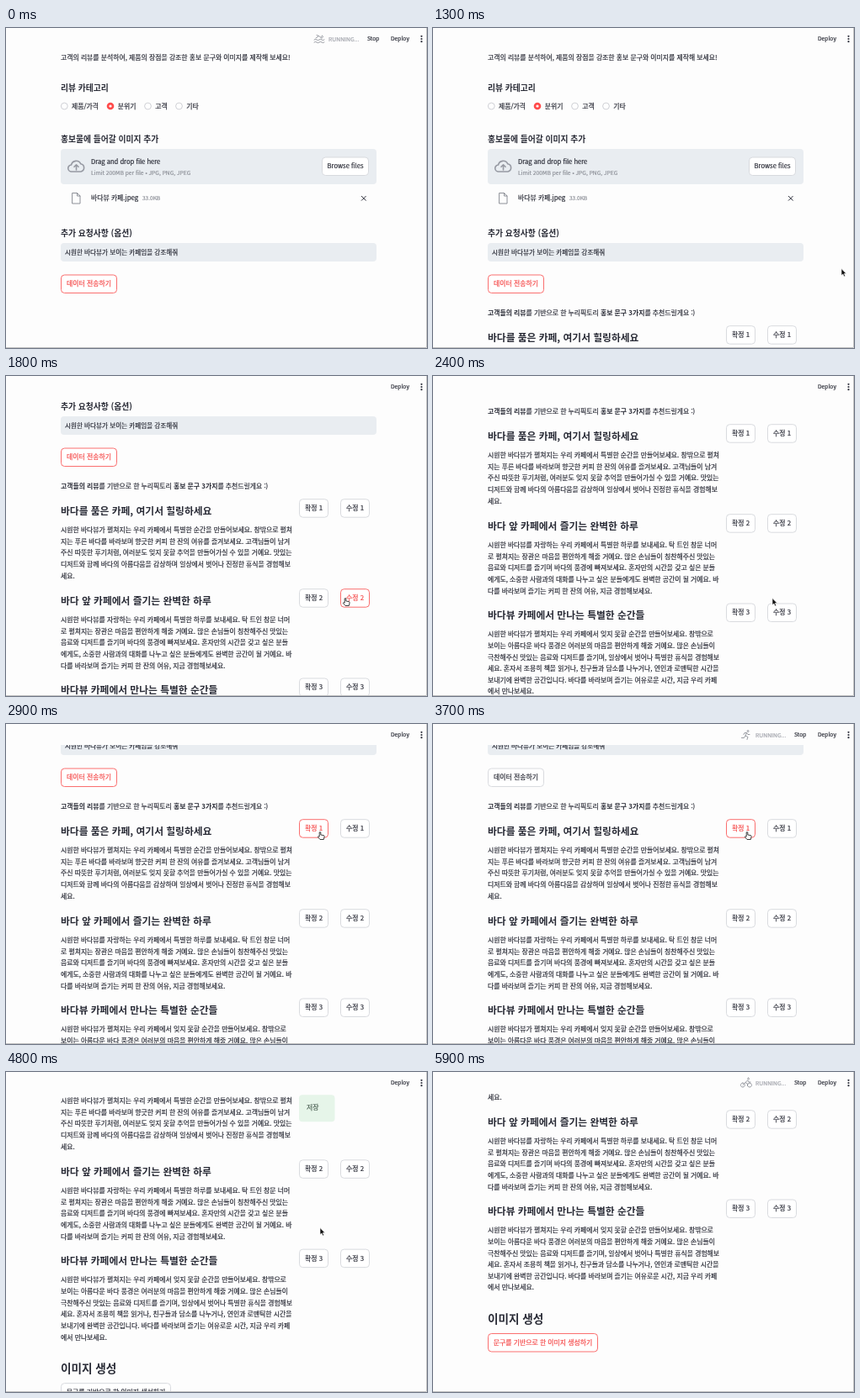
Recreate the animation shown at these times as an HTML page. Size 500 by 381 pixels, loop 6000 ms.

```html
<!DOCTYPE html>
<html lang="ko">
<head>
<meta charset="utf-8">
<style>
  html, body { margin: 0; width: 100%; height: 100%; overflow: hidden; background: #fdfdfd; }
  svg { display: block; width: 500px; height: 381px; }
  text {
    font-family: "Noto Sans CJK KR", "Noto Sans CJK JP", "Noto Sans CJK", sans-serif;
    color: #292b36; fill: currentColor; stroke: currentColor; stroke-width: .2; white-space: pre;
  }
  .line { fill: none; stroke-linecap: round; stroke-linejoin: round; }
  .button rect { fill: #fff; stroke: #d3d5da; stroke-width: .85; }
  .button.hot rect { stroke: #fa5555; }
  .button.hot text { color: #f54848; }
</style>
</head>
<body>
<svg id="stage" viewBox="0 0 500 381"></svg>
<script>
const LOOP = 6000, STEP = 100;
const BODY = 7.86, LATIN = 7.6, LEADING = 13.65, SECTION = 9.8;
const GRAY = '#8d9098', RED = '#ff4b4b';

// y is the visual middle of the line
const text = (x, y, content, size = BODY, extra = '') =>
  `<text x="${x}" y="${y + size * 0.37}" font-size="${size}" ${extra}>${content}</text>`;
const bold = (x, y, content, size) => text(x, y, content, size, 'font-weight="600" style="stroke:none"');
const tinted = (x, y, content, size, color) => text(x, y, content, size, `style="color:${color}"`);
const box = (x, y, w, h, fill) => `<rect x="${x}" y="${y}" width="${w}" height="${h}" rx="4" fill="${fill}"/>`;
const stroke = (d, color, width = 1, id = '') =>
  `<path class="line" id="${id}" d="${d}" stroke="${color}" stroke-width="${width}"/>`;
const lines = (y, list) => list.map((s, i) => text(65, y + i * LEADING, s)).join('');

const buttons = [];
function button(id, x, y, w, label, size = BODY) {
  buttons.push({ id, x, y, w, h: 21.5 });
  return `<g class="button" id="${id}"><rect x="${x}" y="${y}" width="${w}" height="21.5" rx="4"/>` +
    text(x + w / 2, y + 10.5, label, size, 'text-anchor="middle"') + '</g>';
}

function radio(x, label, on) {
  const mark = on
    ? `<circle cx="${x}" cy="93" r="4.3" fill="${RED}"/><circle cx="${x}" cy="93" r="1.6" fill="#fff"/>`
    : `<circle cx="${x}" cy="93" r="3.9" fill="#fff" stroke="#c3c5cb" stroke-width=".8"/>`;
  return mark + text(x + 8.7, 93, label);
}

function idea(n, y, title, paragraph) {
  return bold(65, y + 0.3, title, 11.78) +
    button('ok' + n, 348.5, y - 13.3, 34, '확정 ' + n) +
    button('edit' + n, 397.5, y - 13.3, 34, '수정 ' + n) +
    lines(y + 23, paragraph);
}

const form =
  text(65, 35, '고객의 리뷰를 분석하여, 제품의 장점을 강조한 홍보 문구와 이미지를 제작해 보세요!') +
  bold(65, 71, '리뷰 카테고리', SECTION) +
  radio(69.3, '제품/가격') + radio(124, '분위기', true) + radio(168.5, '고객') + radio(205.5, '기타') +
  bold(65, 132, '홍보물에 들어갈 이미지 추가', SECTION) +
  box(65, 144, 375, 42, '#e9edf1') +
  stroke('M79 171h-1a4 4 0 0 1-.5-8a6 6 0 0 1 11.3-1.2a4.7 4.7 0 0 1 .2 9.2zM83.5 169v-6M81 165.3l2.5-2.5l2.5 2.5', '#9699a2', 1.6) +
  text(101, 159.5, 'Drag and drop file here', LATIN) +
  tinted(101, 173, 'Limit 200MB per file • JPG, PNG, JPEG', 6.68, GRAY) +
  button('browse', 375.5, 154, 55, 'Browse files', LATIN) +
  stroke('M79 196.5h5.5l3.5 3.5v9h-9zM84.5 196.5v3.5h3.5', GRAY) +
  text(101, 202, '바다뷰 카페.jpeg', 7.87) +
  tinted(162, 202.5, '33.0KB', 6.5, GRAY) +
  stroke('M422.3 200.3l5 5m0-5l-5 5', '#31333f') +
  bold(65, 244, '추가 요청사항 (옵션)', SECTION) +
  box(65, 256, 375, 22, '#e9edf1') +
  text(70, 266.7, '시원한 바다뷰가 보이는 카페임을 강조해줘', 7.6) +
  button('send', 65.5, 294, 66, '데이터 전송하기');

const b = s => `<tspan font-weight="600" style="stroke:none">${s}</tspan>`;
const results =
  text(65, 339, `${b('고객들의 리뷰')}를 기반으로 한 누리픽토리 ${b('홍보 문구 3가지')}를 추천드릴게요 :)`) +
  idea(1, 368, '바다를 품은 카페, 여기서 힐링하세요', [
    '시원한 바다뷰가 펼쳐지는 우리 카페에서 특별한 순간을 만들어보세요. 창밖으로 펼쳐',
    '지는 푸른 바다를 바라보며 향긋한 커피 한 잔의 여유를 즐겨보세요. 고객님들이 남겨',
    '주신 따뜻한 후기처럼, 여러분도 잊지 못할 추억을 만들어가실 수 있을 거예요. 맛있는',
    '디저트와 함께 바다의 아름다움을 감상하며 일상에서 벗어나 진정한 휴식을 경험해보',
    '세요.']) +
  idea(2, 475, '바다 앞 카페에서 즐기는 완벽한 하루', [
    '시원한 바다뷰를 자랑하는 우리 카페에서 특별한 하루를 보내세요. 탁 트인 창문 너머',
    '로 펼쳐지는 장관은 마음을 편안하게 해줄 거예요. 많은 손님들이 칭찬해주신 맛있는',
    '음료와 디저트를 즐기며 바다의 풍경에 빠져보세요. 혼자만의 시간을 갖고 싶은 분들',
    '에게도, 소중한 사람과의 대화를 나누고 싶은 분들에게도 완벽한 공간이 될 거예요. 바',
    '다를 바라보며 즐기는 커피 한 잔의 여유, 지금 경험해보세요.']) +
  idea(3, 581.3, '바다뷰 카페에서 만나는 특별한 순간들', [
    '시원한 바다뷰가 펼쳐지는 우리 카페에서 잊지 못할 순간을 만들어보세요. 창밖으로',
    '보이는 아름다운 바다 풍경은 여러분의 마음을 편안하게 해줄 거예요. 많은 손님들이',
    '극찬해주신 맛있는 음료와 디저트를 즐기며, 일상에서 벗어나 특별한 휴식을 경험해보',
    '세요. 혼자서 조용히 책을 읽거나, 친구들과 담소를 나누거나, 연인과 로맨틱한 시간을',
    '보내기에 완벽한 공간입니다. 바다를 바라보며 즐기는 여유로운 시간, 지금 우리 카페',
    '에서 만나보세요.']) +
  `<g id="saved">${box(348, 384, 42.5, 32, '#e6f5e9')}${tinted(357, 399, '저장', BODY, '#4f6457')}</g>` +
  `<g id="create">${bold(65, 709.5, '이미지 생성', 13.6)}${button('image', 65.5, 727.5, 130, '문구를 기반으로 한 이미지 생성하기')}</g>`;

// swimmer, runner, cyclist
const figures = [
  'M366 14q1.5-1.3 3 0t3 0t3 0t3 0M366 17q1.5-1.3 3 0t3 0t3 0t3 0M368 12l3.5-2.5l3.5 2.8M371.5 9.5l-2.5-1M375.5 9.3a1 1 0 1 0 .1 0',
  'M374 7.5a1 1 0 1 0 .1 0M372.5 10.5l-1.5 3.5l3 1.5l-1 3M371 14l-1.5 2.5h-3M369 12.5l1-2h2.5l1.5 2h2',
  'M367.8 13a2.5 2.5 0 1 0 .1 0M376 13a2.5 2.5 0 1 0 .1 0M368 15.5l3-3l2.5 1.5v2.5M371 12.5l2.5-2.5l1.5 2h2M374.5 7a1 1 0 1 0 .1 0'];

document.getElementById('stage').innerHTML =
  '<rect width="500" height="381" fill="#fdfdfd"/>' +
  `<g id="page">${form}<g id="results">${results}</g></g>` +
  '<rect width="500" height="25" fill="#fdfdfd"/>' +
  `<g id="running">${stroke('', GRAY, 0.9, 'figure')}` +
  tinted(383, 13, 'RUNNING...', 6.8, '#a3a5ad') + text(429, 13, 'Stop', 6.7) + '</g>' +
  text(457, 13, 'Deploy', 6.7) +
  [9.8, 13, 16.2].map(y => `<circle cx="493.5" cy="${y}" r="1.1" fill="#31333f"/>`).join('') +
  '<path d="M499.5 0V380.5H0" fill="none" stroke="#c4c4c4"/>' +
  '<g id="pointer" stroke="#fff" stroke-width=".6" fill="#111">' +
  '<path id="arrow" d="M0 .6v8l1.9-1.6l1.3 2.9l1.4-.6l-1.3-2.8h2.5z"/>' +
  '<path id="hand" stroke="#111" stroke-width=".8" fill="#fff" d="M-.8 1q.8-1.3 1.6 0v3l3.5.6q1 .3.8 1.5l-.8 3.4h-4.3l-2.7-3.2q.3-1.3 1.9-.2z"/></g>';

const $ = id => document.getElementById(id);
const show = (id, on) => $(id).setAttribute('visibility', on ? 'visible' : 'hidden');

// Eased interpolation through [time, ...values] rows
function track(rows, t) {
  const next = rows.findIndex(r => r[0] > t);
  if (next === 0) return rows[0].slice(1);
  if (next < 0) return rows[rows.length - 1].slice(1);
  const from = rows[next - 1], to = rows[next];
  const p = (t - from[0]) / (to[0] - from[0]), e = p * p * (3 - 2 * p);
  return from.slice(1).map((v, i) => v + (to[i + 1] - v) * e);
}

const scrolling = [[1400, 0], [1800, 208], [2000, 208], [2300, 297], [2450, 297], [2800, 241],
  [4300, 241], [4600, 350], [4700, 350], [5200, 416]];
const pointing = [[1000, 498, 300], [1300, 485, 286], [1450, 485, 286], [1700, 403, 264], [2500, 403, 264],
  [2850, 373, 128], [3800, 373, 128], [4200, 373, 185], [5000, 373, 185], [5400, 150, 320]];

function draw(now) {
  const t = Math.floor(now % LOOP / STEP) * STEP;
  const [scroll] = track(scrolling, t), [x, y] = track(pointing, t);
  const visible = t >= 1000 && t < 5600;
  const focus = t < 3500 ? 'send' : t < 5500 ? 'ok1' : 'image';
  let over = false;
  for (const { id, x: left, y: top, w, h } of buttons) {
    const dx = x - left, dy = y + scroll - top;
    const hit = visible && dx > 0 && dx < w && dy > 0 && dy < h;
    over = over || hit;
    $(id).classList.toggle('hot', hit || id === focus);
  }
  $('page').setAttribute('transform', `translate(0 ${-scroll})`);
  $('pointer').setAttribute('transform', `translate(${x} ${y})`);
  $('figure').setAttribute('d', figures[t / STEP % 3]);
  $('saved').setAttribute('opacity', track([[4000, 0], [4300, 1]], t)[0]);
  show('results', t >= 1000);
  show('create', t >= 4000);
  show('running', t < 900 || t >= 3600 && t < 4200 || t >= 5600);
  show('arrow', visible && !over);
  show('hand', visible && over);
  requestAnimationFrame(() => draw(performance.now()));
}
draw(0);
</script>
</body>
</html>
```
